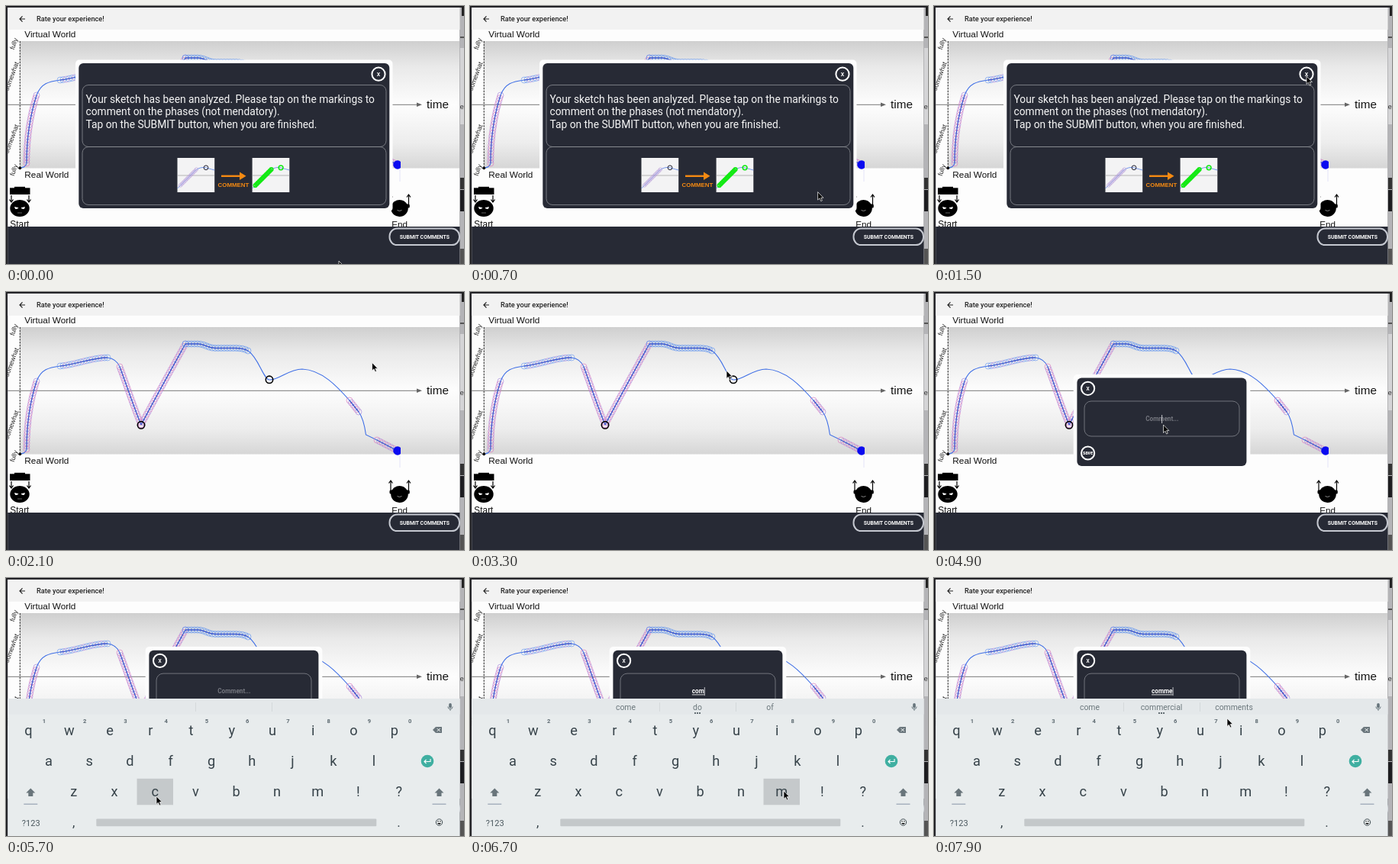
Recreate the animation shown at these times as an HTML page. Size 600 by 338 pixels, loop 8000 ms.

```html
<!DOCTYPE html>
<html lang="en">
<head>
<meta charset="utf-8">
<title>Rate your experience</title>
<style>
html, body { margin: 0; width: 100%; height: 100%; overflow: hidden; background: #fcfcfc; }
svg { display: block; width: 100vw; height: 100vh; font-family: Roboto, sans-serif; }
.arial { font-family: "Liberation Sans", Arial, sans-serif; }
.mid { text-anchor: middle; }
</style>
</head>
<body>
<svg id="stage" viewBox="0 0 600 338" xmlns="http://www.w3.org/2000/svg"></svg>
<script>
const LOOP = 8000, STEP = 100;
const DARK = '#272a35', INK = '#37434a', BLUE = '#3f6fe6', PINK = '#dc78bd', VIOLET = '#a785dc';
const stage = document.getElementById('stage');

const rect = (x, y, w, h, fill, extra = '') =>
  `<rect x="${x}" y="${y}" width="${w}" height="${h}" fill="${fill}" ${extra}/>`;
const text = (x, y, size, fill, str, extra = '') =>
  `<text x="${x}" y="${y}" font-size="${size}" fill="${fill}" ${extra}>${str}</text>`;
const path = (d, stroke, width = 1, extra = '') =>
  `<path d="${d}" fill="none" stroke="${stroke}" stroke-width="${width}" ${extra}/>`;
const ring = (x, y, r, stroke, width, fill = 'none') =>
  `<circle cx="${x}" cy="${y}" r="${r}" stroke="${stroke}" stroke-width="${width}" fill="${fill}"/>`;
const group = (id, body) => `<g id="${id}">${body}</g>`;
const MID = 'class="mid"', BOLD_MID = 'class="mid" font-weight="700"', ARIAL = 'class="arial"';
const roundButton = (x, y, label, size) =>
  ring(x, y, 8.6, '#fff', 2) + text(x, y + 2.4, size, '#fff', label, BOLD_MID);

// Circles strung along a path, colours taken in turn.
function beads(d, colors, r, gap, width) {
  const probe = document.createElementNS('http://www.w3.org/2000/svg', 'path');
  probe.setAttribute('d', d);
  const total = probe.getTotalLength(), n = Math.round(total / gap);
  let out = '';
  for (let i = 0; i <= n; i++) {
    const p = probe.getPointAtLength(total * i / n);
    out += ring(p.x.toFixed(1), p.y.toFixed(1), r, colors[i % colors.length], width);
  }
  return out;
}

const SKETCH = [
  ['M18 212C22 212 26 210 27 206'],
  ['M27 206C27 180 30 148 40 117', [PINK, VIOLET]],
  ['M40 117C46 101 56 99 71 97'],
  ['M71 97C92 95 112 86 133 86', ['#6f9df2', '#6f9df2', '#b58ade']],
  ['M133 86C141 87 146 91 149 98'],
  ['M149 98C158 122 167 150 177 174', [PINK, VIOLET]],
  ['M177 174C196 138 215 104 235 68', [PINK, VIOLET]],
  ['M235 68H252C262 69 264 73 274 73.5H300Q311 73.5 317 77', ['#5f93f0']],
  ['M317 77C331 86 337 114 345 115C357 116 370 101 388 101C414 102 434 124 450 142'],
  ['M450 142L462 157', [PINK, VIOLET]],
  ['M462 157C468 165 470 176 471.5 187L486 194'],
  ['M486 194L511 207', [PINK, VIOLET]]
];

function chart() {
  const label = (x, y, str) =>
    text(0, 0, 8.6, '#222', str, `class="arial mid" transform="translate(${x} ${y}) rotate(-70)"`);
  const arrow = (x, from, to) => {
    const back = to > from ? -3.5 : 3.5;
    return path(`M${x} ${from}V${to}M${x - 2.5} ${to + back}L${x} ${to}L${x + 2.5} ${to + back}`, '#000', 1.2);
  };
  const head = (x, rx) => `<ellipse cx="${x}" cy="265" rx="${rx}" ry="11"/>`;
  return rect(18, 46, 576, 166.5, 'url(#shade)')
    + text(24.3, 41.2, 11.8, '#111', 'Virtual World', ARIAL)
    + text(24.3, 225.3, 11.8, '#111', 'Real World', ARIAL)
    + text(551, 134, 15.3, '#111', 'time', ARIAL)
    + label(13, 50.5, 'fully') + label(10, 93, 'somewhat')
    + label(10, 175, 'somewhat') + label(13, 216, 'fully')
    + path('M18.3 46V212', '#222', 1, 'stroke-dasharray="2.5 1.3"')
    + path('M2 129.3H540', '#777', 1) + '<path d="M538 126.6L545 129.3L538 132Z" fill="#666"/>'
    + SKETCH.map(([d, colors]) => (colors ? beads(d, colors, 4, 3.9, .65) : '')
        + path(d, colors ? '#3a55cc' : BLUE, colors ? 1.3 : 1.1)).join('')
    + '<circle cx="18.3" cy="212.3" r="1.9"/>'
    + ring(177, 174.3, 4.7, '#000', 1.6) + ring(345, 114.8, 4.7, '#000', 1.6)
    + '<path d="M517 203.9V212A5.7 5.7 0 1 1 517 203.9Z" fill="#0a0af0"/>'
    + path('M516 214V230', '#dcdcf6', .8)
    + rect(5, 238.3, 26.5, 8.6, '#000') + rect(11, 236.8, 14, 3, '#000')
    + arrow(7, 248, 257) + arrow(30, 248, 257) + head(18, 12.7)
    + '<path d="M11 263L16.5 264.3Q15 266.8 12 265.8ZM25 263L19.5 264.3Q21 266.8 24 265.8Z" fill="#fff"/>'
    + path('M15 271H21', '#888', .7)
    + arrow(504, 260, 247) + arrow(527.5, 260, 247) + head(515.5, 11.3)
    + rect(502.5, 259.5, 26.3, 5, '#000', 'rx="1.5"')
    + path('M512.5 267.5Q515.5 269.5 518.5 267.5', '#aaa', .8)
    + text(5.3, 289.8, 11.9, '#111', 'Start', ARIAL)
    + text(505.3, 289.8, 11.7, '#111', 'End', ARIAL);
}

function page() {
  return rect(0, 0, 600, 338, '#232327')
    + rect(594.5, 2, 5.5, 336, '#b4b4b7') + rect(597, 0, 3, 13, '#222')
    + rect(595, 40, 5, 2, '#555') + rect(595, 55, 5, 100, '#d4d4d6')
    + text(594.8, 134.5, 9, '#333', 'e', ARIAL)
    + rect(595, 225, 5, 15, '#333') + rect(595, 241, 5, 28, '#1d1d20') + rect(595, 318, 5, 20, '#555')
    + rect(2.2, 2, 592.3, 336, '#fdfdfd')
    + rect(2.2, 2, 592.3, 29, '#f2f2f2')
    + path('M25 17H18M21.5 13.4L18 17L21.5 20.6', '#222', 1.2)
    + text(40, 20.4, 9.2, '#222', 'Rate your experience!', 'font-weight="500"')
    + `<g clip-path="url(#app)">${chart()}</g>`
    + rect(2.2, 289, 592.3, 49, DARK)
    + rect(502.5, 291.5, 91.5, 21.6, DARK, 'rx="10" stroke="#c5c8d0" stroke-width="2"')
    + text(548.4, 304.8, 6.9, '#fff', 'SUBMIT COMMENTS', BOLD_MID);
}

function thumb(x, color, bold) {
  const trail = `M${x + 4} 235L${x + 25} 214`;
  return rect(x, 199, 48.7, 45, '#f3f3f4')
    + path(`M${x} 222H${x + 48.7}`, '#999', .7)
    + path(`M${x} 239L${x + 24} 215Q${x + 31} 210 ${x + 38} 212T${x + 48.7} 215`, BLUE, .7)
    + beads(trail, [color], 2.2, 2.4, bold ? 1.8 : .6)
    + ring(x + 37.5, 211.8, 2.9, bold ? color : '#223', bold ? 1.5 : 1);
}

function intro() {
  const lines = ['Your sketch has been analyzed. Please tap on the markings to',
    'comment on the phases (not mendatory).', 'Tap on the SUBMIT button, when you are finished.'];
  const box = 'rx="8" stroke="#8c8e95" stroke-width=".8"';
  return rect(91, 70.5, 415.5, 199, '#fdfdfd', 'rx="5"')
    + rect(95.3, 75, 407, 190, DARK, 'rx="6"')
    + roundButton(488, 89.2, 'X', 7)
    + rect(100, 103.5, 398, 81, 'none', box) + rect(100, 184.5, 398, 76, 'none', box)
    + lines.map((s, i) => text(104.5, 127 + i * 16.3, 13.8, '#f6f6f6', s)).join('')
    + thumb(224.5, '#b79ad8', false) + thumb(322.6, '#12ea12', true)
    + path('M282 222.8H308', '#f58a12', 2.4) + '<path d="M306 217.6L314.5 222.8L306 228Z" fill="#f58a12"/>'
    + text(298, 237.3, 7.9, '#f58a12', 'COMMENT', 'class="arial mid" font-weight="700"');
}

function commentBox() {
  return rect(182.7, 108, 231.6, 124.6, '#fdfdfd', 'rx="5"')
    + rect(187.4, 112.6, 222, 115.4, DARK, 'rx="6"')
    + roundButton(201.6, 126.3, 'X', 6.5) + roundButton(201.6, 211, 'save', 6.4)
    + rect(197, 143, 203, 46, 'none', 'rx="9" stroke="#85878e" stroke-width=".8"')
    + text(298.8, 169.4, 8.2, '#75777f', 'Comment...', 'id="hint" ' + BOLD_MID)
    + text(298.8, 169.4, 8.2, '#fff', '', 'id="typed" text-decoration="underline" ' + BOLD_MID)
    + path('M0 161V172', '#d8d8dc', .9, 'id="caret"');
}

const PITCH = 53.25;
const ROWS = [['qwertyuiop', 29.5, 200], ['asdfghjkl', 56, 240], ['zxcvbnm!?', 88.7, 280.3]];
function keyCenter(char) {
  const [keys, x, y] = ROWS.find(row => row[0].includes(char));
  return [x + keys.indexOf(char) * PITCH, y];
}

function keyboard() {
  const shift = x => `<path d="M${x} 275.5L${x + 6} 281.5H${x + 3}V286H${x - 3}V281.5H${x - 6}Z" fill="#69757b"/>`
    + path(`M${x - 9} 296.2H${x + 9}`, '#8794a8', 1);
  const letters = ROWS.map(([keys]) => [...keys].map(k => {
    const [x, y] = keyCenter(k);
    return text(x, y + 6, 18.2, INK, k, MID);
  }).join('')).join('');
  const digits = [...'1234567890'].map((n, i) =>
    text(50 + i * PITCH, 189.9, 7.6, '#5d6a71', n, BOLD_MID)).join('');
  return rect(2.2, 158, 592.3, 180, '#e8eced') + rect(2.2, 158, 592.3, 20.5, '#e4e8ea')
    + path('M248.5 163V175M348.5 163V175', '#d0d5d7', .8)
    + [204, 298, 393].map((x, i) => text(x, 173, 10.4, '#6b777c', '', `id="word${i}" ${MID}`)).join('')
    + group('more', [295, 298, 301].map(x => `<circle cx="${x}" cy="177" r="1" fill="${INK}"/>`).join(''))
    + rect(580.2, 164, 3.6, 6.5, '#66747b', 'rx="1.8"')
    + path('M578.8 168.5Q579 171.8 582 171.8T585.2 168.5M582 172V174', '#66747b', .9)
    + rect(0, 0, 47.5, 34.5, '#c5c9cb', 'id="press"')
    + letters + digits
    + '<path d="M559 199L563 195H571V203H563Z" fill="#69757b"/>'
    + path('M564.5 197L569 201M569 197L564.5 201', '#e8eced', 1)
    + '<circle cx="552" cy="240" r="8.3" fill="#3fafa1"/>'
    + path('M556 237V240.5H548M550.5 238L548 240.5L550.5 243', '#fff', 1.1)
    + shift(32.3) + shift(567.5)
    + text(32.7, 324.5, 11, '#4b585f', '?123', MID)
    + text(88.7, 325.5, 17, INK, ',', MID) + text(514.5, 325.5, 17, INK, '.', MID)
    + rect(118.3, 315.5, 367, 9.7, '#c4c8ca', 'rx="1"')
    + ring(567.5, 320, 4.2, '#3e4a50', 1) + '<path d="M565 321H570Q567.5 324.5 565 321Z"/>'
    + '<circle cx="566" cy="318.7" r=".7"/><circle cx="569" cy="318.7" r=".7"/>';
}

stage.innerHTML = `<defs>
  <linearGradient id="shade" x1="0" y1="0" x2="0" y2="1">
    <stop offset="0" stop-color="#cfcfcf"/><stop offset=".2" stop-color="#e9e9e9"/>
    <stop offset=".5" stop-color="#fdfdfd"/><stop offset=".8" stop-color="#ededed"/>
    <stop offset="1" stop-color="#d6d6d6"/>
  </linearGradient>
  <clipPath id="app"><rect x="2.2" y="2" width="592.3" height="287.6"/></clipPath></defs>`
  + page() + group('intro', intro()) + group('comment', commentBox()) + group('keys', keyboard())
  + '<path id="pointer" d="M0 0V10.4L2.4 8.2L4.1 12L5.8 11.2L4.2 7.6H7.4Z" stroke="#fff" stroke-width=".7"/>';

const el = id => document.getElementById(id);
const show = (id, on) => el(id).setAttribute('display', on ? 'inline' : 'none');

const INTRO_END = 1800, COMMENT_START = 4000, FOCUS = 4800, KEYS_START = 5200;
const PRESSES = [[5600, 'c'], [6100, 'o'], [6600, 'm'], [6900, 'm'], [7300, 'e']];
const HOLD = 200;
const WORDS = [[0, ['', '', '']], [6300, ['come', 'do', 'of']], [7000, ['come', 'commercial', 'comments']]];
const POINTER = [
  [0, 436, 334], [300, 438, 326], [1300, 488, 92], [1900, 488, 92], [3300, 336, 103],
  [3600, 344, 113], [4000, 344, 113], [4700, 300.5, 174], [5200, 300.5, 174],
  [5600, 197, 286], [5750, 197, 286], [6100, 456, 202], [6250, 456, 202],
  [6600, 411, 279], [7000, 411, 279], [7300, 137, 202], [7450, 137, 202], [7900, 384, 184]
];

function pointerAt(t) {
  const i = POINTER.findIndex(k => k[0] > t);
  if (i < 0) return POINTER[POINTER.length - 1].slice(1);
  const [t0, x0, y0] = POINTER[i - 1], [t1, x1, y1] = POINTER[i];
  const u = (t - t0) / (t1 - t0), e = u * u * (3 - 2 * u);
  return [x0 + (x1 - x0) * e, y0 + (y1 - y0) * e];
}

function render(t) {
  const typing = t >= KEYS_START;
  show('intro', t < INTRO_END);
  show('comment', t >= COMMENT_START);
  show('keys', typing);
  el('comment').setAttribute('transform', `translate(0 ${typing ? -17.9 : 0})`);

  // A letter reaches the field just after its key goes down.
  const typed = PRESSES.filter(p => t >= p[0] + 100 + (p[1] === 'c' ? 100 : 0)).map(p => p[1]).join('');
  el('typed').textContent = typed;
  show('hint', !typed);
  const caretX = typed ? 299.3 + el('typed').getComputedTextLength() / 2 : 298.6;
  el('caret').setAttribute('transform', `translate(${caretX} 0)`);
  show('caret', typed || (t >= FOCUS && t < KEYS_START + 200));

  const down = PRESSES.find(p => t >= p[0] && t < p[0] + HOLD);
  show('press', down);
  if (down) {
    const [x, y] = keyCenter(down[1]);
    el('press').setAttribute('x', x - 23.7);
    el('press').setAttribute('y', y - 17.5);
  }
  const words = WORDS.filter(w => t >= w[0]).pop()[1];
  words.forEach((w, i) => { el('word' + i).textContent = w; });
  show('more', words[0]);

  el('pointer').setAttribute('transform', `translate(${pointerAt(t).join(' ')})`);
}

const start = performance.now();
function tick() {
  const t = (performance.now() - start) % LOOP;
  render(Math.floor(t / STEP) * STEP);
  requestAnimationFrame(tick);
}
tick();
</script>
</body>
</html>
```
